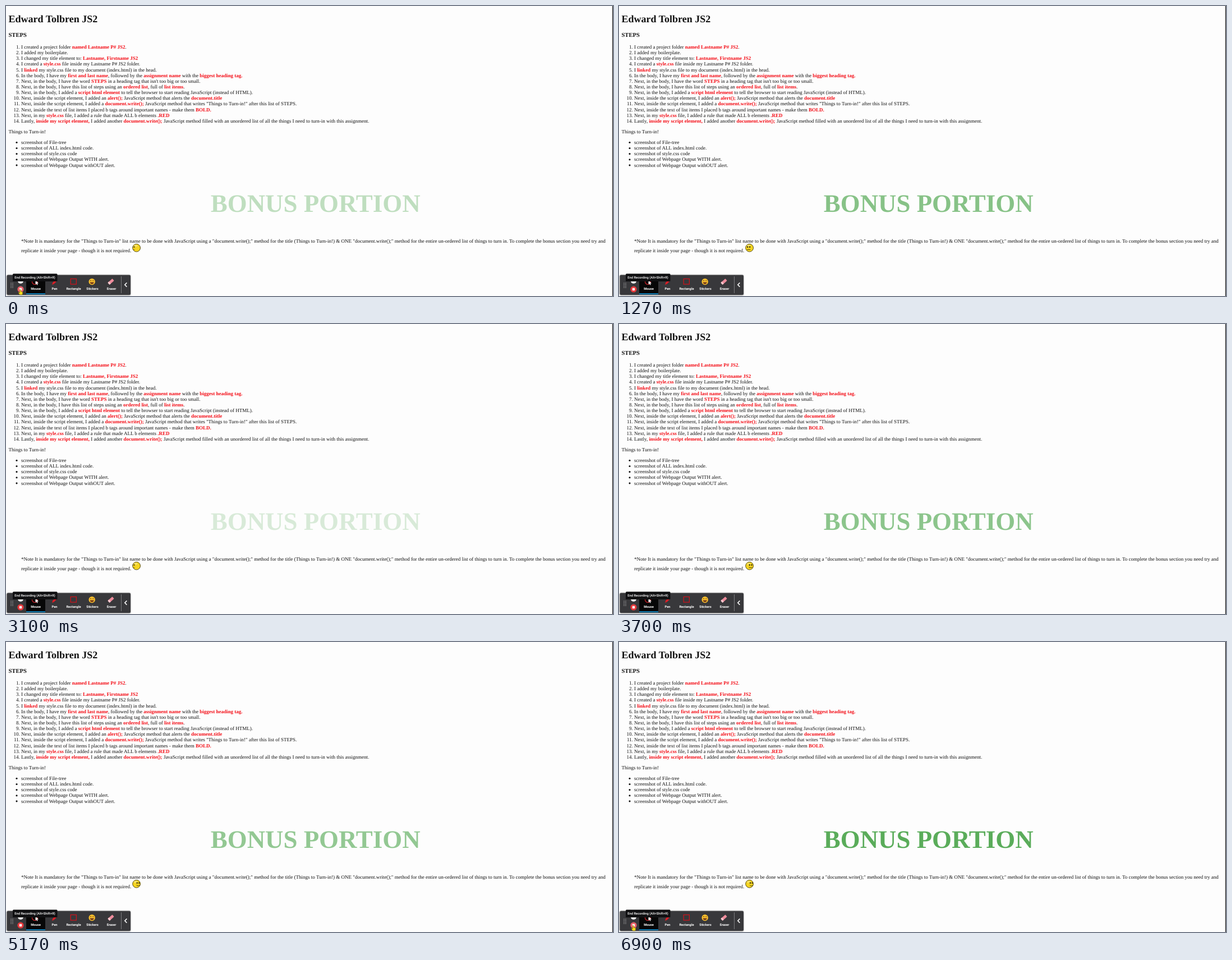
An HTML page for the animation above (6.93 s loop, 1082 by 517 pixels).

```html
<!DOCTYPE html>
<html lang="en">
<head>
<meta charset="utf-8">
<title>JS2</title>
<style>
html, body { margin: 0; width: 100%; height: 100%; overflow: hidden; background: #fdfdfd; }
svg { display: block; }
#page { font: 9.016px "Liberation Serif", "Times New Roman", serif; fill: #111; text-rendering: geometricPrecision; }
#page .b { font-weight: bold; fill: #f40d16; }
#bar text { font: 500 5.8px Roboto, sans-serif; fill: #fff; text-anchor: middle; text-rendering: geometricPrecision; }
#bar .label { font-weight: 700; }
</style>
</head>
<body>
<svg width="1082" height="517" viewBox="0 0 1082 517">
  <defs>
    <clipPath id="ball"><circle r="6.6"/></clipPath>
    <filter id="shadow" x="-5%" y="-20%" width="110%" height="150%">
      <feDropShadow dx="0" dy=".5" stdDeviation="1.2" flood-opacity=".6"/>
    </filter>
  </defs>
  <rect width="1082" height="517" fill="#fdfdfd"/>
  <rect x="1080.8" width="1.2" height="517" fill="#222"/>

  <g id="page">
    <text x="4.5" y="28.5" font-size="18" font-weight="bold">Edward Tolbren JS2</text>
    <text x="4.5" y="54.5" font-size="10.55" font-weight="bold">STEPS</text>
    <text x="4.5" y="227">Things to Turn-in!</text>
    <text id="bonus" x="551.7" y="367" font-size="44.9" font-weight="bold" text-anchor="middle" fill="#008000">BONUS PORTION</text>
    <text x="27" y="422">*Note It is mandatory for the "Things to Turn-in" list name to be done with JavaScript using a "document.write();" method for the title (Things to Turn-in!) &amp; ONE "document.write();" method for the entire un-ordered list of things to turn in. To complete the bonus section you need try and</text>
    <text x="27" y="438.5">replicate it inside your page - though it is not required.</text>
  </g>

  <g transform="translate(232.6 431.2)">
    <circle r="6.9" fill="#f5d421" stroke="#453a08" stroke-width=".9"/>
    <g clip-path="url(#ball)">
      <ellipse cx="-1.5" cy="-3.8" rx="3.4" ry="1.9" fill="#fff" opacity=".3"/>
      <g id="face">
        <ellipse cx="-2" cy="-1.6" rx="1.1" ry="1.4" fill="#1b1605"/>
        <ellipse cx="2" cy="-1.6" rx="1.1" ry="1.4" fill="#1b1605"/>
        <path id="mouth" fill="none" stroke="#2b2306" stroke-width=".9" stroke-linecap="round"/>
      </g>
    </g>
  </g>

  <g id="bar">
    <rect x="1.5" y="479.5" width="220.5" height="35.5" rx="2" fill="#38383a" filter="url(#shadow)"/>
    <rect x="36" y="480" width="34" height="34" fill="#070707"/>
    <rect x="36" y="512.3" width="34" height="1.7" fill="#1193d4"/>
    <path d="M9 493.5v9M12 493.5v9" stroke="#bbb" stroke-width="1.2" stroke-dasharray="1.2 1.4"/>
    <circle cx="26" cy="489.6" r="5.2" fill="#fff"/>
    <circle id="stop" cx="26" cy="505" r="5.6" fill="#e5383b"/>
    <rect x="23.8" y="502.8" width="4.4" height="4.4" rx=".6" fill="#fff"/>
    <circle cx="51.5" cy="491.5" r="5" fill="none" stroke="#d3222a" stroke-width="1.2"/>
    <path d="M52.5 488.5v8l1.8-1.6 1.2 2.6 1.3-.6-1.2-2.5h2.4z" fill="#fff"/>
    <path d="M82 497l1.2-4 5.2-5.6 2.6 2.5-5.3 5.6z" fill="#d81e26"/>
    <rect x="115.2" y="486.4" width="10.2" height="9.6" fill="none" stroke="#c9141c" stroke-width="1.3"/>
    <circle cx="153.2" cy="491.5" r="5.7" fill="#f7bd2d"/>
    <path d="M149.8 490q1.2-1.4 2.4 0M154.2 490q1.2-1.4 2.4 0" fill="none" stroke="#503010" stroke-width=".9"/>
    <path d="M149.7 492.6h7q-.6 3.2-3.5 3.2t-3.5-3.2z" fill="#70351a"/>
    <g transform="rotate(-42 187 491.5)">
      <rect x="181.5" y="489" width="11" height="5" rx="1" fill="#ee8c9c"/>
      <rect x="181.5" y="489" width="3.2" height="5" rx="1" fill="#f7c9cf"/>
    </g>
    <path d="M205.5 482v30" stroke="#858587" stroke-width=".9"/>
    <path d="M215.4 493.4l-3.6 3.6 3.6 3.6" fill="none" stroke="#fff" stroke-width="1.5"/>
    <rect x="12" y="477.3" width="79.5" height="13.8" rx="1.5" fill="#101012"/>
    <text x="51.6" y="486.2">End Recording (Alt+Shift+R)</text>
  </g>
  <path id="hand" d="M24.4 505.6q1-1.2 1.8 0v3.4l2.5.6q1.2.4 1 1.8l-.6 3.4h-4.6l-2.5-3.7q.5-1.2 2.4.2z" fill="#f6dc1c" stroke="#6d5c08" stroke-width=".5"/>
</svg>
<script>
const LOOP = 6930, PITCH = 10.143;
const $ = id => document.getElementById(id);

// Words between asterisks are bold and red.
const steps = [
  'I created a project folder *named Lastname P# JS2*.',
  'I added my boilerplate.',
  'I changed my title element to: *Lastname, Firstname JS2*',
  'I created a *style.css* file inside my Lastname P# JS2 folder.',
  'I *linked* my style.css file to my document (index.html) in the head.',
  'In the body, I have my *first and last name*, followed by the *assignment name* with the *biggest heading tag.*',
  "Next, in the body, I have the word *STEPS* in a heading tag that isn't too big or too small.",
  'Next, in the body, I have this list of steps using an *ordered list*, full of *list items*.',
  'Next, in the body, I added a *script html element* to tell the browser to start reading JavaScript (instead of HTML).',
  'Next, inside the script element, I added an *alert();* JavaScript method that alerts the *document.title*',
  'Next, inside the script element, I added a *document.write();* JavaScript method that writes "Things to Turn-in!" after this list of STEPS.',
  'Next, inside the text of list items I placed b tags around important names - make them *BOLD.*',
  'Next, in my *style.css* file, I added a rule that made ALL b elements *.RED*',
  'Lastly, *inside my script element,* I added another *document.write();* JavaScript method filled with an unordered list of all the things I need to turn-in with this assignment.'
];
const turnIn = ['File-tree', 'ALL index.html code.', 'style.css code', 'Webpage Output WITH alert.', 'Webpage Output withOUT alert.'];
const tools = { Mouse: 53, Pen: 86.5, Rectangle: 120.5, Stickers: 154, Eraser: 188 };

const text = (x, y, s, attrs = '') => `<text x="${x}" y="${y}" ${attrs}>${s}</text>`;
const add = (id, markup) => $(id).insertAdjacentHTML('beforeend', markup);

steps.forEach((step, i) => {
  const y = 76 + i * PITCH;
  add('page', text(24.8, y, i + 1 + '.', 'text-anchor="end"') +
    text(27, y, step.replace(/\*(.+?)\*/g, '<tspan class="b">$1</tspan>')));
});
turnIn.forEach((item, i) => {
  const y = 246 + i * PITCH;
  add('page', `<circle cx="19" cy="${y - 2.7}" r="1.55"/>` + text(27, y, 'screenshot of ' + item));
});
for (const name in tools) add('bar', text(tools[name], 506.2, name, 'class="label"'));

// Linear interpolation through [time, value] points.
function track(points, t) {
  const i = Math.max(1, points.findIndex(p => p[0] >= t));
  const [t0, a] = points[i - 1], [t1, b] = points[i];
  return a + (b - a) * (t - t0) / (t1 - t0);
}
const turn = [[0, -5.2], [700, 3.2], [1270, -1.4], [2130, 3.2], [2870, -.8], [3100, -5.2]];
const smile = [[0, 1], [700, 1], [1270, 0], [2130, 1], [3400, 1], [4370, -1], [5300, 1], [LOOP, 1]];

function draw() {
  const t = performance.now() % LOOP;
  const phase = ((t - 245 + 1500) % 1500) / 750;
  $('bonus').setAttribute('opacity', .73 * (1 - Math.abs(1 - phase)));

  const x = track(turn, t % 3100), bend = 2.2 * track(smile, t);
  const squash = Math.sqrt(1 - (x / 7) ** 2);
  $('face').setAttribute('transform', `translate(${x} 0) scale(${squash} 1)`);
  $('mouth').setAttribute('d', `M-2.8 ${3 - bend / 4}Q0 ${3 + bend} 2.8 ${3 - bend / 4}`);

  const hover = t < 300 || t > 6600;
  $('hand').setAttribute('visibility', hover ? 'visible' : 'hidden');
  $('stop').setAttribute('fill', hover ? '#e8606a' : '#e5383b');
  requestAnimationFrame(draw);
}
draw();
</script>
</body>
</html>
```
